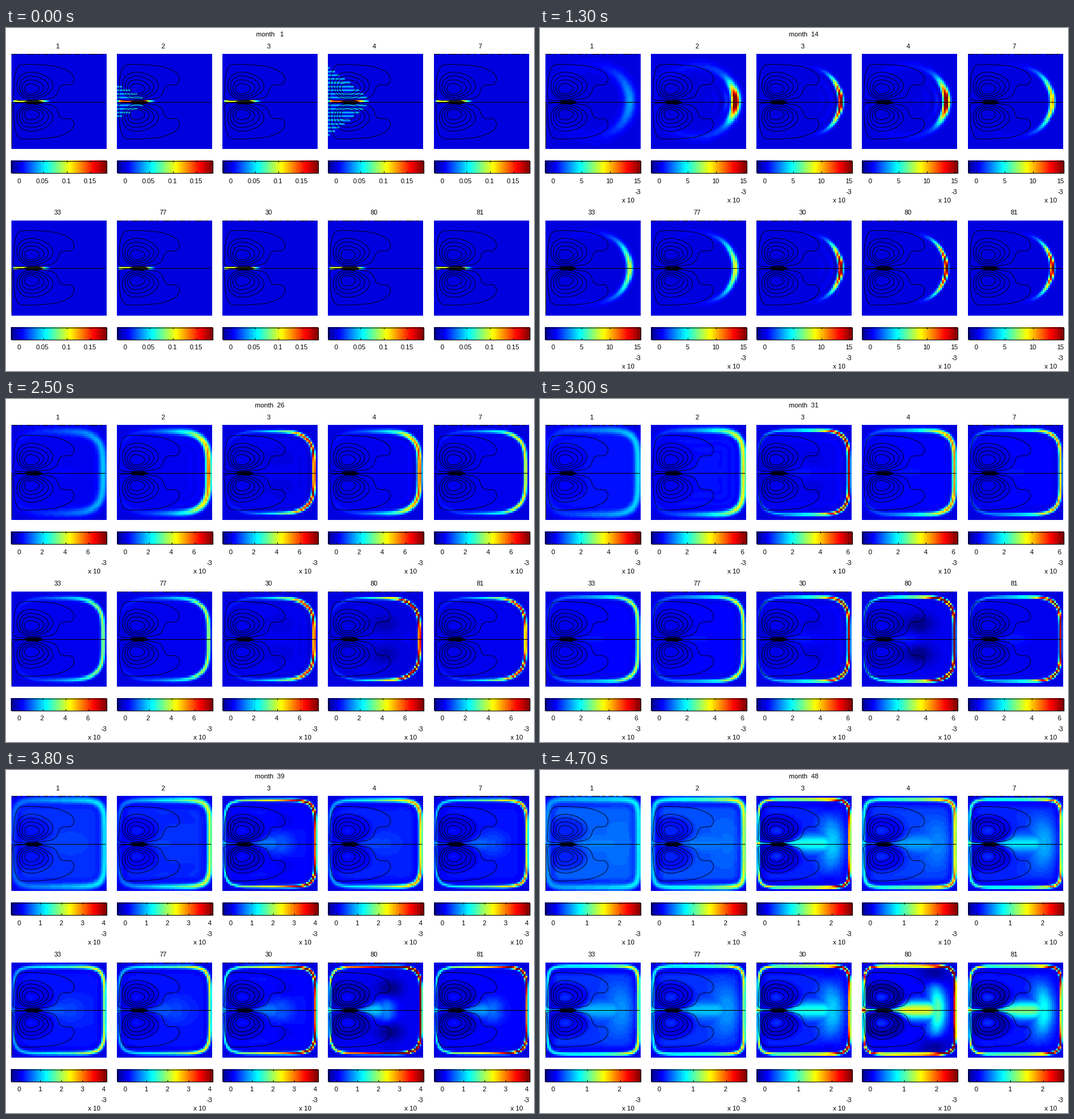
These frames come from a looping animation (876 px wide and 570 px high, 4.8 s). A matplotlib script:

```python
import numpy as np
import matplotlib.pyplot as plt
from matplotlib.animation import FuncAnimation

plt.rcParams.update({"font.family": "Liberation Sans", "font.size": 11})

W, H, DPI = 876, 570, 72
MONTHS = 48
N = 51              # cells per side
SIZE = 158          # panel side in pixels
BAR_W, BAR_H = 159, 21

# sharpness of each advection scheme, 0 = most diffusive
SHARPNESS = {"1": 0, "2": 0.2, "3": 0.7, "4": 0.4, "7": 0.6,
             "33": 0.48, "77": 0.52, "30": 0.7, "80": 1, "81": 0.85}
UNLIMITED = {"2", "3", "4", "30", "80"}
CENTRED = {"2", "4"}

cells = (np.arange(N) + 0.5) / N
X, Y = np.meshgrid(cells, abs(cells - 0.5))
ODD_ROW = (np.arange(N) % 2)[:, None]


def jet64():
    k = np.arange(1, 65)
    channel = lambda j: np.clip(np.minimum(j, 48 - j) / 16, 0, 1)
    return np.stack([channel(k - 24), channel(k - 8), channel(k + 8)], axis=-1)


JET = jet64()


def ramp(x, a, b):
    return np.clip((x - a) / (b - a), 0, 1)


def smooth(x, a, b):
    t = ramp(x, a, b)
    return t * t * (3 - 2 * t)


def bell(x, width):
    return np.exp(-(x / width) ** 2)


def color_max(month):
    months = [1, 7, 14, 20, 31, 39, 48]
    peaks = [0.185, 0.0298, 0.0155, 0.0095, 0.0063, 0.00414, 0.00262]
    return np.exp(np.interp(month, months, np.log(peaks)))


def front_frame(month):
    """Signed distance to the front, a growing superellipse, and angle along it."""
    apex = 0.98 - 0.56 * np.exp((1 - month) / 7.26)
    c = 0.5 * ramp(month, -1, 13)
    b = (0.47 - 0.16 * np.exp((7 - month) / 14)) * ramp(month, 0.8, 7)
    n = 2 + 6 * ramp(month, 14, 48) ** 1.2
    dx = X - c
    a = np.where(dx > 0, apex - c, c - 0.02)
    p, q = abs(dx) / a + 1e-3, Y / b + 1e-6
    r = (p**n + q**n) ** (1 / n)
    grad = np.hypot((p / r) ** (n - 1) / a, (q / r) ** (n - 1) / b)
    return (r - 1) / grad, np.arctan2(q, dx / a)


def front(s, unlimited, month, d, phi):
    early = 1.15 if unlimited else 0.2 + 1.2 * s**1.7
    late = 0.28 + 0.85 * s**2 + 0.2 * unlimited
    gain = early + (late - early) * ramp(month, 14, 34)

    spread = 0.25 + 0.6 * s if unlimited else 1 - 0.3 * s
    spread += 0.6 * (1 - spread) * ramp(month, 7, 25)
    reach = 0.6 + 3.4 * (month / 48) ** 2
    along = bell(phi, reach * spread)

    corner = (0.1 + 0.5 * s) * ramp(month, 18, 32) * np.sin(2 * phi) ** 4
    tail = (0.15 - 0.22 * s) * bell(phi, 2.2 * reach) * (1 - ramp(month, 20, 34))
    shape = along * (1 + corner * (phi < np.pi / 2)) + tail * (1 - along)

    width = (0.016 + 0.034 * (1 - s) ** 2) * (0.72 + 1.3 * np.exp(-month / 12))
    wave = np.cos(20 * np.pi * d) * np.exp(np.minimum(d, 0) / 0.08) * (d < -0.03)
    wave *= 0.3 * (1 - s) * unlimited * along * (1 - ramp(month, 14, 35))
    return gain * smooth(month, 1, 3) * (shape * bell(d, width) + wave)


def start_jet(name, month):
    """First pulse on the axis, with grid noise in the centred schemes."""
    streak = smooth(X, 0, 0.04) * (1 - smooth(X, 0.3, 0.43)) * (Y < 0.5 / N)
    val = 0.55 * streak * np.exp((1 - month) / 1.3)
    if name in CENTRED:
        order = int(name)
        height = 0.09 * order * np.clip(1 - X / (0.2 + 0.06 * order), 0, 1) ** 0.8
        val += 0.2 * (Y < height) * ODD_ROW * np.exp((1 - month) / 1.2)
    return val


def interior(s, unlimited, month, d):
    """Slow filling around the gyres: background, plume and dark cores."""
    fill = ramp(month, 22, 48)
    gyre = np.hypot((X - 0.21) / 0.23, (Y - 0.135) / 0.15)
    outside = smooth(gyre, 0.6, 1.25)
    val = (0.13 - 0.1 * s) * fill * smooth(-d, 0, 0.12) * (0.5 + 0.5 * outside)

    grow = ramp(month, 34, 48)
    head = 0.52 + 0.28 * grow
    stem = bell(Y, 0.02 + 0.07 * smooth(X, 0.3, 0.55)) * (1 - smooth(X, head - 0.12, head + 0.1))
    cap = bell(X - head + 0.5 * Y**2, 0.09 + 0.12 * (1 - s))
    cap = cap * (1 - smooth(Y, 0.02, 0.08 + 0.36 * grow))
    val += (0.03 + 0.5 * s**2) * fill**2 * outside * np.maximum(stem, 0.7 * cap)

    val += fill * s * (0.07 * fill * bell(gyre, 0.3) - 0.09 * bell(gyre - 0.75, 0.35))
    lobe = bell(X - 0.6 - 0.15 * grow, 0.14) * bell(Y - 0.16 - 0.2 * grow, 0.1)
    return val - 0.12 * unlimited * s**4 * smooth(month, 20, 31) * lobe


def tracer(name, month, d, phi):
    """Concentration relative to the colour maximum."""
    s, unlimited = SHARPNESS[name], name in UNLIMITED
    return (front(s, unlimited, month, d, phi) + start_jet(name, month)
            + interior(s, unlimited, month, d))


def paint(val):
    return JET[np.clip((val + 0.1) / 1.1 * 64, 0, 63).astype(int)]


def spline(points, steps=10):
    """Closed Catmull-Rom curve."""
    p1 = np.array(points, float)
    p0, p2, p3 = (np.roll(p1, k, axis=0) for k in (1, -1, -2))
    t = np.linspace(0, 1, steps, endpoint=False)[None, :, None]
    p0, p1, p2, p3 = (p[:, None, :] for p in (p0, p1, p2, p3))
    out = 0.5 * (2 * p1 + (p2 - p0) * t + (2 * p0 - 5 * p1 + 4 * p2 - p3) * t**2
                 + (3 * p1 - p0 - 3 * p2 + p3) * t**3)
    out = out.reshape(-1, 2)
    return np.vstack([out, out[:1]])


def streamlines():
    outer = [(5, 4), (4, 18), (5, 40), (11, 58), (24, 62), (51, 61), (76, 58),
             (97, 49), (104, 38), (99, 29), (87, 28), (80, 24), (74, 11),
             (62, 5), (30, 2)]
    curves = [spline(outer)]
    th = np.linspace(0, 2 * np.pi, 70)
    for k in range(4):
        left, right, low, high = 9 + 4.3 * k, 69 - 7.6 * k, 4 + 3 * k, 49 - 6.3 * k
        x = (left + right) / 2 + (right - left) / 2 * np.cos(th + 0.2 * np.sin(th))
        y = (low + high) / 2 + (high - low) / 2 * np.sin(th)
        curves.append(np.stack([x, y], axis=-1))
    curves += [np.array([(18 + 3 * k, k), (54 - 3 * k, k)]) for k in (1, 2, 3)]
    return curves


fig = plt.figure(figsize=(W / DPI, H / DPI), dpi=DPI, facecolor="white")
ax = fig.add_axes([0, 0, 1, 1])
ax.axis("off")


def line(xs, ys, lw=1, **kw):
    return ax.plot(xs, ys, color="black", lw=lw, solid_capstyle="butt", **kw)[0]


def label(x, y, text=""):
    return ax.text(x, y, text, ha="center", va="center_baseline", color="black")


def image(rgb, x, y, w, h):
    return ax.imshow(rgb, extent=(x, x + w, y + h, y), aspect="auto",
                     interpolation="nearest", zorder=1)


class Panel:
    def __init__(self, name, i):
        self.name = name
        row, col = divmod(i, 5)
        x, y = round(8.8 + 175.2 * col), 43 + 276.5 * row
        top = round(y)
        mid = np.floor(y + 79.4) + 0.5
        self.img = image(np.zeros((N, N, 3)), x, top, SIZE, SIZE)
        label(x + 76.5, y - 13, name)
        for c in CURVES:
            for sign in (-1, 1):
                line(x + c[:, 0], mid + sign * c[:, 1], lw=0.85, zorder=2)
        line([x, x + 156], [mid, mid], zorder=2)
        if i in (0, 4, 6, 7, 8):
            line([x, x + 155], [top - 0.5] * 2, zorder=3,
                 dashes=(9, 4, 4, 7, 14, 3, 6, 5))
        if col == 0:
            line([x - 0.5] * 2, [mid, mid + 75], zorder=3)

        self.bx, self.by = round(8.4 + 175.35 * col), top + 177
        image(JET[None], self.bx, self.by, BAR_W, BAR_H)
        line(self.bx + 0.5 + (BAR_W - 1) * np.array([0, 1, 1, 0, 0]),
             self.by + 0.5 + (BAR_H - 1) * np.array([0, 0, 1, 1, 0]), zorder=3)
        self.ticks = line([], [], zorder=3)
        self.labels = [label(0, y + 210.5) for _ in range(7)]
        self.power = [label(x + 137.5, y + 242.5, "x 10"),
                      label(x + 153, y + 228.5, "-3")]

    def update(self, month, top, d, phi):
        self.img.set_data(paint(tracer(self.name, month, d, phi)))
        small = top < 0.02
        step = tick_step(top)
        xs, ys = [], []
        for k, text in enumerate(self.labels):
            v = k * step
            text.set_visible(v <= top)
            if v > top:
                continue
            px = self.bx + BAR_W * (v / top + 0.1) / 1.1
            text.set_x(px - 0.8)
            text.set_text(f"{v * 1000 if small else v:.4g}")
            for y0 in (0, BAR_H - 3):
                xs += [px, px, np.nan]
                ys += [self.by + y0, self.by + y0 + 3, np.nan]
        self.ticks.set_data(xs, ys)
        for text in self.power:
            text.set_visible(small)


def tick_step(top):
    unit = 10.0 ** np.floor(np.log10(top))
    lead = top / unit
    return unit * (0.2 if lead < 1.2 else 0.5 if lead < 2 else 1 if lead < 5 else 2)


CURVES = streamlines()
panels = [Panel(name, i) for i, name in enumerate(SHARPNESS)]
title = label(437.5, 10)
ax.set_xlim(0, W)
ax.set_ylim(H, 0)


def draw(frame):
    month = frame + 1
    title.set_text(f"month {month:3d}")
    d, phi = front_frame(month)
    top = color_max(month)
    for p in panels:
        p.update(month, top, d, phi)
    return []


anim = FuncAnimation(fig, draw, frames=MONTHS, interval=100, repeat=True,
                     repeat_delay=0, blit=False)
plt.show()
```
